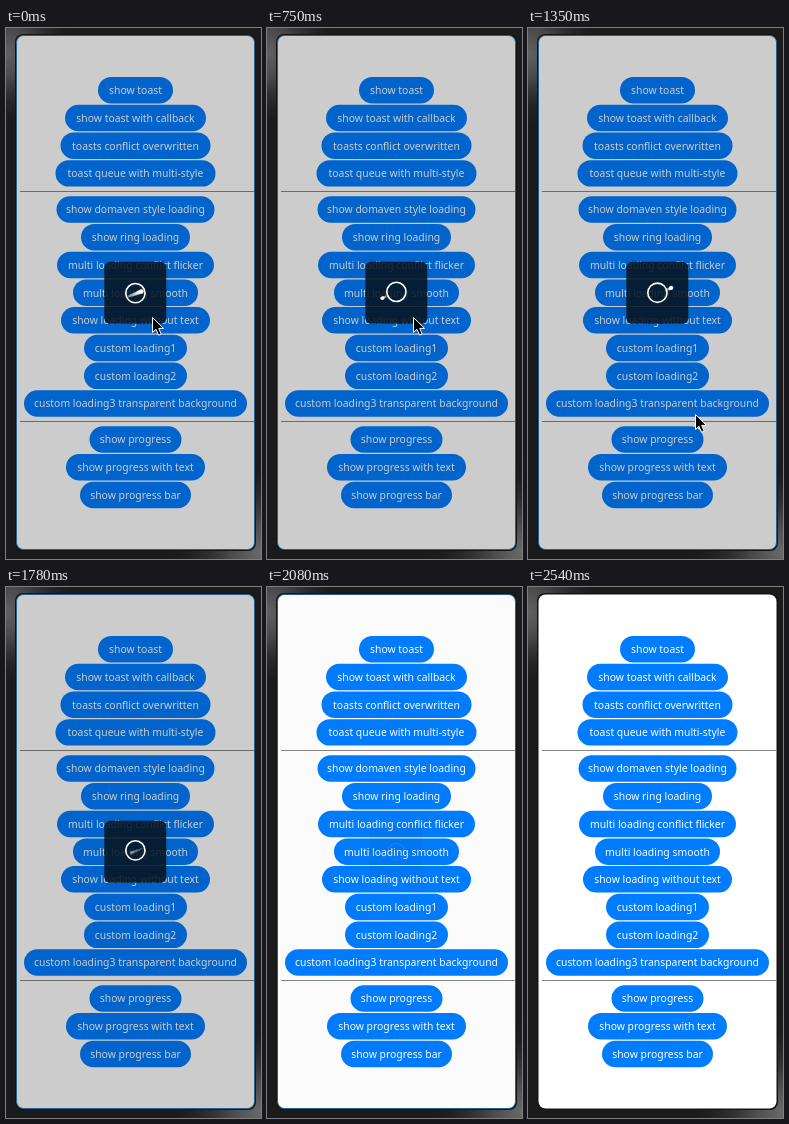
An HTML page that plays this animation: 255x531 px, repeating every 2.56 s.

```html
<!DOCTYPE html>
<html lang="en">
<head>
<meta charset="utf-8">
<title>Loading dialog</title>
<style>
  html, body { margin: 0; width: 100%; height: 100%; overflow: hidden; background: #181818; }
  svg { display: block; width: 100vw; height: 100vh; }
  text { font: 500 10.4px "Noto Sans", "Open Sans", sans-serif; fill: #fff; text-anchor: middle; }
</style>
</head>
<body>
<svg viewBox="0 0 255 531">
  <defs>
    <radialGradient id="shineLeft" gradientUnits="userSpaceOnUse" cx="0" cy="25" r="75">
      <stop offset="0" stop-color="#626262"/>
      <stop offset=".35" stop-color="#484848"/>
      <stop offset="1" stop-color="#1b1b1b" stop-opacity="0"/>
    </radialGradient>
    <radialGradient id="shineRight" gradientUnits="userSpaceOnUse" cx="255" cy="525" r="95">
      <stop offset="0" stop-color="#6a6a6a"/>
      <stop offset=".3" stop-color="#4c4c4c"/>
      <stop offset="1" stop-color="#1b1b1b" stop-opacity="0"/>
    </radialGradient>
  </defs>
  <rect width="255" height="531" fill="#1b1b1b"/>
  <rect width="255" height="531" fill="url(#shineLeft)"/>
  <rect width="255" height="531" fill="url(#shineRight)"/>
  <rect x="9" y="6" width="241" height="517" rx="8" fill="#141414"/>
  <rect x="10.5" y="7.5" width="238" height="514" rx="7" fill="#fff"/>
  <path d="M14 163.5H248.5M14 393.5H248.5" stroke="#858585"/>
  <g id="buttons"></g>
  <rect id="dim" x="10.5" y="7.5" width="238" height="514" rx="7"/>
  <rect id="edge" x="10.5" y="7.5" width="238" height="514" rx="7" fill="none" stroke="#1b5d95" stroke-width=".9"/>
  <g id="dialog">
    <rect x="98.3" y="233.7" width="62" height="62" rx="6" fill="#081420" fill-opacity=".87"/>
    <g id="back"></g>
    <circle id="ring" cx="129.4" r="9.6" fill="none" stroke="#fff" stroke-width="1.6"/>
    <g id="front"></g>
  </g>
  <path id="cursor" d="M.5 .5V15.5L4 12.3L6.6 18.2L9.2 17L6.7 11.4H11.5Z" stroke="#fff" stroke-width="1"/>
</svg>
<script>
const byId = id => document.getElementById(id);
const LOOP = 2560, ORBIT = 1200, TAIL = 24;

// Label, vertical centre, width
const buttons = [
  ["show toast", 62.2, 75], ["show toast with callback", 90, 141],
  ["toasts conflict overwritten", 117.7, 150], ["toast queue with multi-style", 145.4, 160],
  ["show domaven style loading", 181.5, 158], ["show ring loading", 209.2, 109],
  ["multi loading conflict flicker", 237, 157], ["multi loading smooth", 264.7, 125],
  ["show loading without text", 292.3, 149], ["custom loading1", 320, 103],
  ["custom loading2", 347.8, 103], ["custom loading3 transparent background", 375.5, 223],
  ["show progress", 411.5, 92], ["show progress with text", 439.2, 139],
  ["show progress bar", 467, 111]
];
byId("buttons").innerHTML = buttons.map(([label, y, w]) =>
  `<rect x="${129.5 - w / 2}" y="${y - 13.2}" width="${w}" height="26.4" rx="13.2" fill="#007dff"/>
   <text x="129.5" y="${y + 3.9}">${label}</text>`).join("");

// Times at which the picture is refreshed
const ticks = [0, 150, 300, 450, 600, 750, 900, 1050, 1200, 1350, 1490, 1640, 1780, 1930, 2080, 2230, 2540];

// Start time, page dimming, dialog opacity, dialog scale
const phases = [[0, .2, 1, 1], [1930, .15, .8, .92], [2080, .015, .05, .85], [2230, .012, 0, .85], [2540, 0, 0, .85]];

// Start time and tip of the pointer
const pointer = [[0, 146, 289], [1350, 167, 386], [1490, 181, 515], [1640, -50, 0]];

const latest = (list, time) => list.filter(([start]) => start <= time).pop();
const turnAt = time => (time + 53) / ORBIT * 2 * Math.PI;

// Tilted orbit that lingers at both ends and hurries through the middle
function orbit(time) {
  const turn = turnAt(time);
  const angle = turn + .32 * Math.sin(2 * turn);
  const x = 14.5 * Math.sin(angle), depth = Math.cos(angle);
  return { x: 129.2 + x, y: 265.1 - .385 * x + depth * .8, depth };
}

function comet(time) {
  const { depth } = orbit(time);
  let dots = "";
  for (let i = TAIL; i >= 0; i--) {
    const p = orbit(time - i * 6), fade = 1 - i / (TAIL + 1);
    const r = (1.9 + .4 * depth) * (.45 + .55 * fade);
    const alpha = (i ? .5 * fade : .95) * (.68 + .32 * depth);
    dots += `<circle cx="${p.x}" cy="${p.y}" r="${r}" fill="#fff" fill-opacity="${alpha}"/>`;
  }
  const ahead = depth > -.5;
  byId("front").innerHTML = ahead ? dots : "";
  byId("back").innerHTML = ahead ? "" : dots;
}

function draw(now) {
  const elapsed = now % LOOP;
  const time = ticks.filter(t => t <= elapsed).pop();
  const [, dim, opacity, scale] = latest(phases, time);
  const [, x, y] = latest(pointer, time);
  byId("dim").setAttribute("opacity", dim);
  byId("edge").setAttribute("opacity", dim ? 1 : 0);
  byId("dialog").setAttribute("opacity", opacity);
  byId("dialog").setAttribute("transform", `translate(129.5 264.5) scale(${scale}) translate(-129.5 -264.5)`);
  byId("ring").setAttribute("cy", 264.3 + .9 * Math.cos(turnAt(time)));
  byId("cursor").setAttribute("transform", `translate(${x} ${y})`);
  comet(time);
}

const begin = performance.now();
function frame() {
  draw(performance.now() - begin);
  requestAnimationFrame(frame);
}
frame();
</script>
</body>
</html>
```
